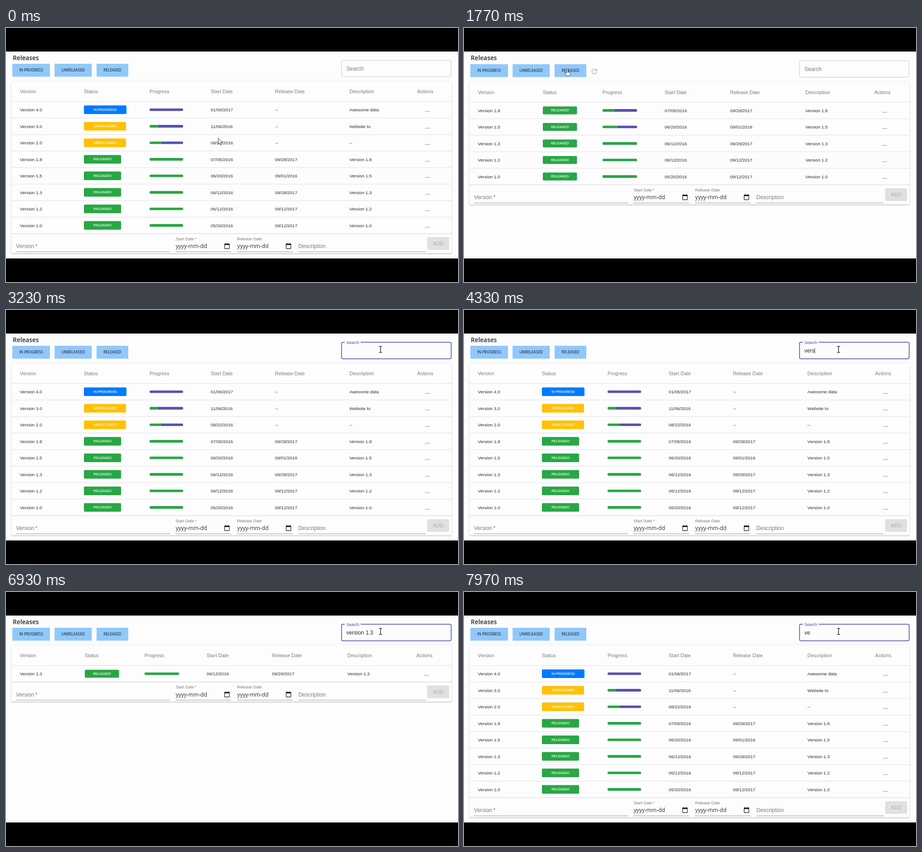
An HTML page that plays this animation: 998x561 px, repeating every 8000 ms.

```html
<!DOCTYPE html>
<html lang="en">
<head>
<meta charset="utf-8">
<title>Releases</title>
<style>
  html, body { margin: 0; width: 100%; height: 100%; overflow: hidden; background: #000; }
  svg { display: block; width: 100%; height: 100%; }
  text { font-family: "Liberation Sans", Arial, sans-serif; white-space: pre; }
  .ui { font-family: "Open Sans", "Noto Sans", sans-serif; }
  .card { fill: #fdfdfe; filter: drop-shadow(0 1px 1.2px rgba(0, 0, 0, .32)); }
</style>
</head>
<body>
<svg id="stage" viewBox="0 0 998 561"></svg>
<script>
const LOOP = 8000;
const INK = "#2b2b2d", GREY = "#7b7b7e", INDIGO = "#3f4ba8";
const GREEN = "#28a745", BLUE = "#007bff", AMBER = "#ffc107", TRACK = "#5652ae";
const ROW_H = 36.5, TABLE_TOP = 119.7, BODY_TOP = 162.3;

const HEADERS = ["Version", "Status", "Progress", "Start Date", "Release Date", "Description", "Actions"];
const WIDE = { cols: [30.5, 172, 317, 452, 594, 758.3, 907.8], pad: 21.3, badgeH: 19, bar: 74 };
const NARROW = { cols: [30.5, 174, 305.7, 443, 587.5, 753.8, 906], pad: 18, badgeH: 17.5, bar: 76.5 };
const STATUS = {
  "IN PROGRESS": { fill: BLUE, width: 51.4 },
  "UNRELEASED": { fill: AMBER, width: 50.4 },
  "RELEASED": { fill: GREEN, width: 39.5 }
};
const ROWS = [
  ["4.0", "IN PROGRESS", 0, "01/06/2017", "--", "Awesome data"],
  ["3.0", "UNRELEASED", 25, "11/06/2016", "--", "Website to"],
  ["2.0", "UNRELEASED", 35, "08/22/2016", "--", "--"],
  ["1.8", "RELEASED", 100, "07/05/2016", "09/28/2017", "Version 1.8"],
  ["1.5", "RELEASED", 100, "06/20/2016", "09/01/2016", "Version 1.5"],
  ["1.3", "RELEASED", 100, "06/12/2016", "09/28/2017", "Version 1.3"],
  ["1.2", "RELEASED", 100, "06/12/2016", "09/12/2017", "Version 1.2"],
  ["1.0", "RELEASED", 100, "05/20/2016", "09/12/2017", "Version 1.0"]
];

// Which rows are listed from each moment on; `filter` marks a pressed button.
const ALL = ROWS.slice(), DONE = ROWS.slice(3);
const VIEWS = [
  { at: 0, rows: ALL },
  { at: 600, rows: ROWS.slice(0, 1), filter: true },
  { at: 1150, rows: ROWS.slice(1, 3), filter: true },
  { at: 1700, rows: DONE, filter: true },
  { at: 2200, rows: ALL },
  { at: 5130, rows: DONE },
  { at: 6200, rows: [ROWS[5]] },
  { at: 7000, rows: DONE },
  { at: 7230, rows: ALL }
];

const FOCUS_AT = 3000, CARET_END = 6730;
const QUERY = "version 1.3";
const KEYS = [[3530, 0]];
[3750, 3920, 4080, 4230, 4430, 4560, 4700, 4850, 5130, 5850, 6200].forEach((at, i) => KEYS.push([at, i + 1]));
for (let i = 0; i < 9; i++) KEYS.push([7000 + 115 * i, 10 - i]);

const POINTER = [
  [0, 468.5, 243], [60, 468.5, 243], [480, 60, 92], [680, 60, 92], [1020, 150, 91],
  [1200, 150, 91], [1540, 228, 90], [1850, 228, 90], [2100, 288, 94], [2260, 288, 94], [2880, 827, 87]
];

const mix = (a, b, k) => a + (b - a) * k;
const clamp = k => Math.max(0, Math.min(1, k));
const smooth = k => k * k * (3 - 2 * k);
const lastBefore = (list, t, key) => list.filter(e => key(e) <= t).pop();

// The CSS "ease" curve, cubic-bezier(.25, .1, .25, 1).
function ease(x) {
  if (x <= 0 || x >= 1) return clamp(x);
  const curve = (a, b, s) => 3 * s * (1 - s) ** 2 * a + 3 * s * s * (1 - s) * b + s ** 3;
  let lo = 0, hi = 1;
  for (let i = 0; i < 24; i++) {
    const mid = (lo + hi) / 2;
    if (curve(.25, .25, mid) < x) lo = mid; else hi = mid;
  }
  return curve(.1, 1, lo);
}

const text = (x, y, size, fill, str, extra = "") =>
  `<text x="${x}" y="${y}" font-size="${size}" fill="${fill}" ${extra}>${str}</text>`;
const rect = (x, y, w, h, fill, r = 0, extra = "") =>
  `<rect x="${x}" y="${y}" width="${w}" height="${h}" rx="${r}" fill="${fill}" ${extra}/>`;
const path = (d, fill, extra = "") => `<path d="${d}" fill="${fill}" ${extra}/>`;
const group = (x, y, body, scale = 1) => `<g transform="translate(${x} ${y}) scale(${scale})">${body}</g>`;
const centred = 'text-anchor="middle"';

// Bars keep their slot when the list changes and glide to the new value.
function progress(v, slot, t) {
  const target = VIEWS[v].rows[slot][2];
  if (!v || !VIEWS[v - 1].rows[slot]) return target;
  const from = progress(v - 1, slot, VIEWS[v].at);
  return mix(from, target, ease((t - VIEWS[v].at) / 600));
}

function bar(x, y, w, pct) {
  const part = (fill, left, right) =>
    rect(x, y - 3, w, 6, fill, 2.8, `style="clip-path:inset(0 ${right}% 0 ${left}%)"`);
  return (pct < 99.9 ? part(TRACK, pct, 0) : "") + (pct > .1 ? part(GREEN, 0, 100 - pct) : "");
}

function badge(x, y, name, look) {
  const { fill, width } = STATUS[name], w = width + 2 * look.pad;
  return rect(x, y - look.badgeH / 2, w, look.badgeH, fill, 2.5) +
    text(x + w / 2, y + 2.4, 7.4, "#fff", name, centred + ' stroke="#fff" stroke-width=".15"');
}

function toolbar(dy, refresh) {
  const button = (x, w, label) => rect(x, 79 + dy, w, 28.5, "#90c8fa") +
    text(x + w / 2, 96.2 + dy, 8.35, "#1f2c38", label, `class="ui" ${centred} stroke="#1f2c38" stroke-width=".12"`);
  const icon = "M17.65 6.35C16.2 4.9 14.21 4 12 4c-4.42 0-7.99 3.58-7.99 8s3.57 8 7.99 8c3.73 0 6.84-2.55 7.73-6h-2.08c-.82 2.33-3.04 4-5.65 4-3.31 0-6-2.69-6-6s2.69-6 6-6c1.66 0 3.14.69 4.22 1.78L13 11h7V4l-2.35 2.35z";
  return text(15, 71, 13.7, "#26282c", "Releases", 'class="ui" font-weight="600"') +
    button(14, 83, "IN PROGRESS") + button(107.3, 82, "UNRELEASED") + button(200, 70, "RELEASED") +
    (refresh ? group(278.8, 86.7, path(icon, "#b6b6b8"), .75) : "");
}

function search(t, dy) {
  const k = smooth(clamp((t - FOCUS_AT) / 200)), focused = t >= FOCUS_AT;
  let out = rect(740.9, 71.3 + dy, 242, 36.4, "none", 3,
    focused ? `stroke="${INDIGO}" stroke-width="1.5"` : 'stroke="#c6c6ca" stroke-width="1"');
  if (focused) out += rect(748, 69.5, 35 * k, 3.4, "#fdfdfe");
  out += text(751.4, mix(94.2 + dy, 74.7, k), mix(12.15, 9, k), focused ? INDIGO : GREY, "Search");
  const key = lastBefore(KEYS, t, e => e[0]);
  if (!key) return out;
  const typed = QUERY.slice(0, key[1]);
  out += text(751.4, 94.2, 12.15, INK, typed, 'id="typed"');
  const lit = t < CARET_END && (t - key[0]) % 1060 < 530;
  return out + (lit ? rect(751.4, 84, .8, 12.5, INK, 0, 'id="caret"') : "");
}

function table(v, t, dy) {
  const { rows } = VIEWS[v], look = rows[0][1] === "RELEASED" ? NARROW : WIDE, c = look.cols;
  const height = BODY_TOP - TABLE_TOP + rows.length * ROW_H;
  const line = y => rect(12, y - .5, 972, 1, "#dfdfe4");
  let out = rect(12, TABLE_TOP + dy, 972, height, "", 3, 'class="card"') + line(BODY_TOP + dy);
  HEADERS.forEach((h, i) => out += text(c[i], 144.2 + dy, 10.85, GREY, h));
  rows.forEach((row, i) => {
    const y = BODY_TOP + ROW_H * (i + .5) + dy;
    const cell = (col, str) => text(c[col], y + 3.6, 9.85, INK, str);
    out += cell(0, "Version " + row[0]) + badge(c[1], y - .1, row[1], look) +
      bar(c[2], y - .1, look.bar, progress(v, i, t)) +
      cell(3, row[3]) + cell(4, row[4]) + cell(5, row[5]) +
      text(c[6] + 17.4, y + 4.9, 13, INK, "...") + line(y + ROW_H / 2);
  });
  return out + group(0, TABLE_TOP + height + dy, form());
}

function form() {
  const underline = (x, w) => rect(x, 39.5, w, 1, "#98989b");
  const star = gap => `<tspan dx="${gap}">*</tspan>`;
  const calendar = "M20 3h-1V1h-2v2H7V1H5v2H4c-1.1 0-2 .9-2 2v16c0 1.1.9 2 2 2h16c1.1 0 2-.9 2-2V5c0-1.1-.9-2-2-2zm0 18H4V8h16v13z";
  const date = (x, label) => text(x + .4, 14.7, 9.05, GREY, label) +
    text(x + .8, 31.8, 12, INK, "yyyy-mm-dd", 'class="ui"') +
    group(x + 107, 20.3, path(calendar, "#111"), .58) + underline(x, 123.3);
  return rect(12, .5, 972, 43, "", 3, 'class="card"') +
    text(22, 32.2, 12.1, GREY, "Version" + star(2.4)) + underline(22, 340) +
    date(374, "Start Date" + star(1.8)) + date(509.8, "Release Date") +
    text(645.4, 32.2, 12.15, GREY, "Description") + underline(645.6, 281.6) +
    rect(930, 7.8, 48.4, 28, "#e0e0e2", 3) + text(954.2, 25.8, 11, "#adadb1", "ADD", centred);
}

function pointer(t) {
  let i = POINTER.findIndex(p => p[0] > t);
  if (i < 0) i = POINTER.length;
  const a = POINTER[i - 1], b = POINTER[i] || a;
  const k = a === b ? 0 : smooth((t - a[0]) / (b[0] - a[0]));
  const x = mix(a[1], b[1], k), y = mix(a[2], b[2], k);
  const inside = (l, r, top, bottom) => x > l && x < r && y > top && y < bottom;
  const outline = 'stroke="#222" stroke-width=".9" stroke-linejoin="round"';
  let shape;
  if (inside(740, 984, 71, 108)) {
    shape = path("M-3.5-6.6h2.4q1.1 0 1.1 1v11.2q0 1-1.1 1h-2.4M3.5-6.6h-2.4q-1.1 0-1.1 1M0 5.6q0 1 1.1 1h2.4",
      "none", 'stroke="#111" stroke-width="1.3"');
  } else if (inside(14, 97, 79, 108) || inside(107, 190, 79, 108) || inside(200, 297, 79, 108)) {
    shape = path("M-1.4 1.2q1.4-2 2.8 0v5l4.2 1.2q1.5.5 1.4 2.4l-.8 4q-.4 1.6-2 1.6h-4.3q-1.2 0-2-1.2l-3.5-4.7q.4-1.6 2-.8l2.2 1.4z", "#fff", outline) +
      path("M1.4 6.2v2.4M3.5 7v2.2", "none", outline);
  } else {
    shape = path("M0 0V13.4L3 10.6L5.2 15.6L7.4 14.6L5.3 9.8H9.3Z", "#fff", outline);
  }
  return group(x, y, shape);
}

const stage = document.getElementById("stage");
let shown = "";

function draw(t) {
  const v = VIEWS.indexOf(lastBefore(VIEWS, t, e => e.at)), filtered = !!VIEWS[v].filter;
  const toolDy = filtered ? .9 : 0, tableDy = filtered ? 1.5 : 0;
  const markup = rect(0, 0, 998, 561, "#000") + rect(0, 52, 998, 457, "#fdfdfe") +
    toolbar(toolDy, filtered) + search(t, toolDy) +
    rect(12, 115 + tableDy, 972, 1, "#ebebef") + table(v, t, tableDy) + pointer(t);
  if (markup === shown) return;
  stage.innerHTML = shown = markup;
  const caret = document.getElementById("caret");
  if (caret) {
    const typed = document.getElementById("typed");
    caret.setAttribute("x", 751.4 + typed.getComputedTextLength());
  }
}

const start = performance.now();
function tick() {
  draw((performance.now() - start) % LOOP);
  requestAnimationFrame(tick);
}
tick();
</script>
</body>
</html>
```
